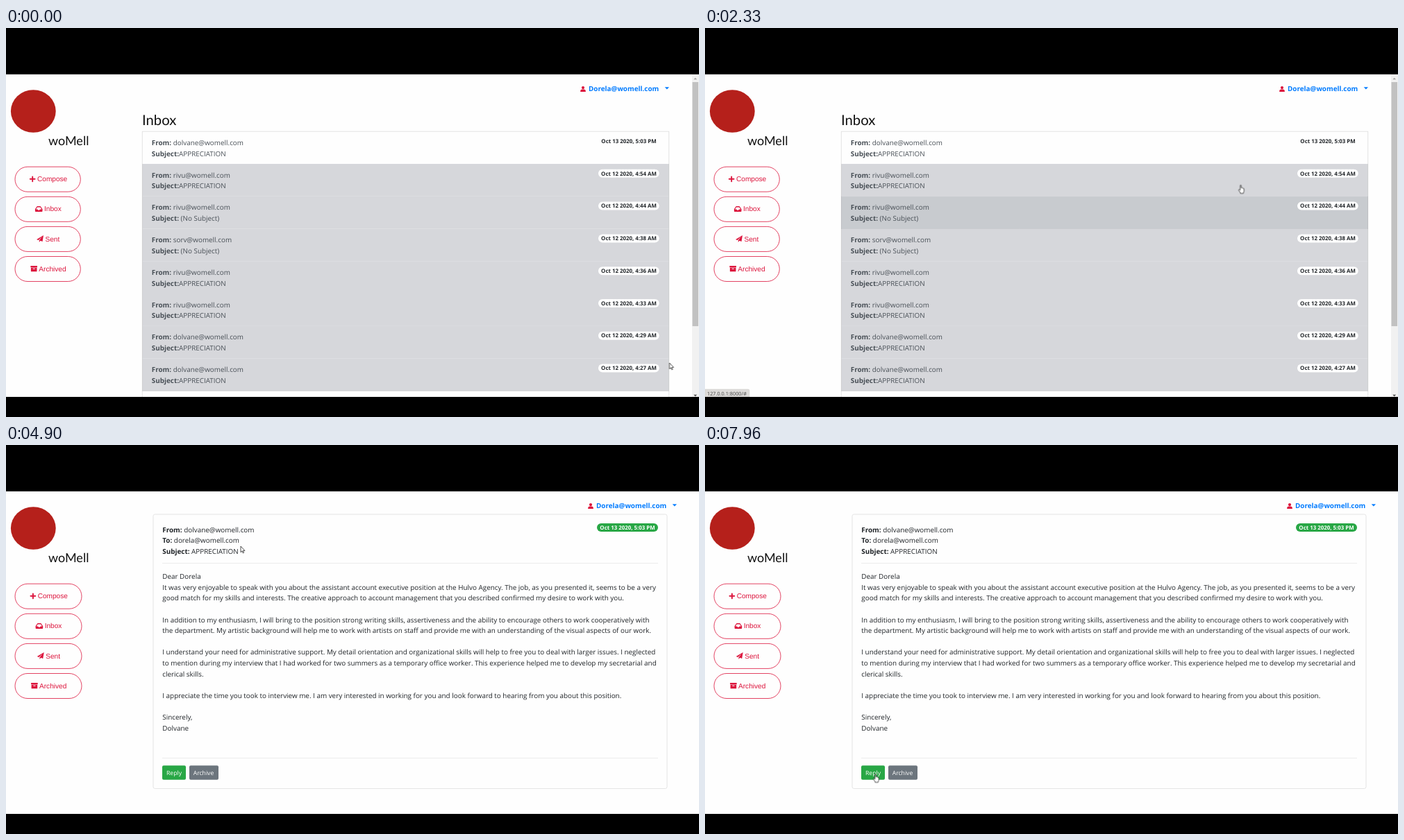
These frames come from a looping animation (998 px wide and 561 px high, 8 s). An HTML page:

```html
<!DOCTYPE html>
<html lang="en">
<head>
<meta charset="utf-8">
<title>Mail inbox</title>
<style>
html, body { margin: 0; width: 100%; height: 100%; overflow: hidden; background: #000; }
svg { display: block; width: 100vw; height: 100vh; }
text { font: 9.88px "Open Sans", sans-serif; fill: #212529; text-rendering: geometricPrecision; white-space: pre; }
.b { font-weight: 700; }
.list text { fill: #495057; }
.list .date, .date { font-size: 7.88px; font-weight: 700; text-anchor: middle; fill: #212529; }
.title { font: 20.3px Lato, sans-serif; fill: #111; }
.menu text { font: 10.1px "Liberation Sans", Arial, sans-serif; fill: #dc143c; }
.menu rect.pill { fill: none; stroke: #dc143c; stroke-width: .8; }
.user { font-weight: 700; fill: #007bff; }
.btn { font-size: 8.65px; fill: #fff; }
.light { fill: #fff; }
.status text { font-size: 7.3px; fill: #444; }
.rule { stroke: #e8e8e8; stroke-width: .8; }

.step { opacity: 0; animation: 8s step-end infinite; }
#inbox { animation-name: inbox; }
#letter { animation-name: letter; }
#hover7 { animation-name: hover7; }
#hover2 { animation-name: hover2; }
#hover1 { animation-name: hover1; }
#hover0 { animation-name: hover0; }
#short { animation-name: short; }
#wide { animation-name: wide; }
#arrow { animation-name: arrow; }
#hand { animation-name: hand; }
#beam { animation-name: beam; }
#cursor { animation: move 8s linear infinite; }

@keyframes inbox { 0% { opacity: 1 } 44.125%, 100% { opacity: 0 } }
@keyframes letter { 0% { opacity: 0 } 44.125%, 100% { opacity: 1 } }
@keyframes hover7 { 0% { opacity: 0 } 14.5% { opacity: 1 } 17.875%, 100% { opacity: 0 } }
@keyframes hover2 { 0% { opacity: 0 } 17.875% { opacity: 1 } 29.5%, 100% { opacity: 0 } }
@keyframes hover1 { 0% { opacity: 0 } 29.5% { opacity: 1 } 37%, 100% { opacity: 0 } }
@keyframes hover0 { 0% { opacity: 0 } 40.75%, 100% { opacity: 1 } }
@keyframes short { 0% { opacity: 0 } 20% { opacity: 1 } 43.25%, 100% { opacity: 0 } }
@keyframes wide { 0% { opacity: 0 } 43.25% { opacity: 1 } 49.4%, 100% { opacity: 0 } }
@keyframes arrow {
  0% { opacity: 1 } 14.5% { opacity: 0 } 47.875% { opacity: 1 } 48.4% { opacity: 0 }
  57.2% { opacity: 1 } 65.1% { opacity: 0 } 74.9% { opacity: 1 } 78.9% { opacity: 0 }
  86.6% { opacity: 1 } 90.2% { opacity: 0 } 94.7% { opacity: 1 } 99.1%, 100% { opacity: 0 }
}
@keyframes hand { 0% { opacity: 0 } 14.5% { opacity: 1 } 47.875% { opacity: 0 } 99.1%, 100% { opacity: 1 } }
@keyframes beam {
  0% { opacity: 0 } 48.4% { opacity: 1 } 57.2% { opacity: 0 } 65.1% { opacity: 1 }
  74.9% { opacity: 0 } 78.9% { opacity: 1 } 86.6% { opacity: 0 } 90.2% { opacity: 1 } 94.7%, 100% { opacity: 0 }
}
@keyframes move {
  0%, 14.11% { transform: translate(955.5px, 483px) }
  14.125% { transform: translate(953px, 480px) }
  17.875%, 19.99% { transform: translate(872px, 262px) }
  20% { transform: translate(868px, 266px) }
  21.25% { transform: translate(800px, 310px) }
  22.5%, 22.85% { transform: translate(742px, 338px) }
  24.4% { transform: translate(722px, 352px) }
  26.9% { transform: translate(738px, 300px) }
  29.125%, 29.48% { transform: translate(771.5px, 226.5px) }
  29.5%, 33.24% { transform: translate(771.5px, 224px) }
  33.25% { transform: translate(768px, 218px) }
  35.75% { transform: translate(722px, 180px) }
  37%, 47.86% { transform: translate(715px, 172.5px) }
  47.875% { transform: translate(712px, 174px) }
  51.25% { transform: translate(600px, 235px) }
  54.4% { transform: translate(440px, 225px) }
  57.5%, 61.24% { transform: translate(368px, 178px) }
  61.25%, 61.6% { transform: translate(338px, 146px) }
  63.125% { transform: translate(310px, 116px) }
  66.25% { transform: translate(330px, 220px) }
  71.25%, 74.49% { transform: translate(352px, 400px) }
  74.5% { transform: translate(348px, 402px) }
  76.25% { transform: translate(262px, 455px) }
  78.75% { transform: translate(420px, 420px) }
  82%, 85.74% { transform: translate(650px, 284px) }
  85.75%, 86.2% { transform: translate(706px, 234.3px) }
  87.5% { transform: translate(860px, 130px) }
  88.5% { transform: translate(885px, 102px) }
  91.25% { transform: translate(700px, 230px) }
  95%, 97.86% { transform: translate(362px, 432px) }
  97.875% { transform: translate(345px, 438px) }
  98.75% { transform: translate(268px, 462px) }
  99.1% { transform: translate(235px, 472px) }
  99.5%, 100% { transform: translate(245.5px, 474.5px) }
}
</style>
</head>
<body>
<svg viewBox="0 0 998 561" preserveAspectRatio="none">
  <defs>
    <path id="plus" d="M-3.4 0H3.4M0-3.4V3.4" stroke="#dc143c" stroke-width="1.9" stroke-linecap="round"/>
    <path id="tray" fill="#dc143c" fill-rule="evenodd" d="M-5.3.4-3-3.2Q-2.6-3.8-2-3.8H2Q2.6-3.8 3-3.2L5.3.4V3q0 1-1 1h-8.600q-1 0-1-1zM-2.200-2.400-4 .5h2.200l.8 1.300h2l.8-1.300H4L2.200-2.400z"/>
    <path id="plane" fill="#dc143c" d="M-5 .9 5-4.900 3.500 4 .5 2.700-1.200 4.900V2.200L3-3-2.300 1.900z"/>
    <path id="box" fill="#dc143c" fill-rule="evenodd" d="M-4.800-4.200h9.600v2.300h-9.600zM-4.300-1.300h8.600v5.500h-8.600zM-1.500-.3v.9h3v-.9z"/>
    <g id="account">
      <path fill="#dc143c" d="M831 84a2.100 2.100 0 0 1 0 4.200a2.100 2.100 0 0 1 0-4.200M827.200 92v-.9q0-2.500 2.500-2.500h2.600q2.500 0 2.500 2.500v.9z"/>
      <text class="user" x="839" y="90.700">Dorela@womell.com</text>
      <path fill="#007bff" d="M948.700 85.200h6.300l-3.150 3.200z"/>
    </g>
  </defs>

  <rect y="66.600" width="998" height="466" fill="#fefefe"/>
  <ellipse cx="39.300" cy="120" rx="32.400" ry="30.800" fill="#b5201b"/>
  <text class="title" x="61" y="169" style="font-size:18px">woMell</text>

  <g id="inbox" class="step">
    <use href="#account"/>
    <text class="title" x="196" y="140">Inbox</text>
    <g id="list" class="list"></g>
    <rect x="988" y="67" width="10" height="465" fill="#f1f1f1"/>
    <rect x="988.500" y="78" width="8.500" height="352" fill="#c1c1c1"/>
    <path d="M990.300 74.300h4.800l-2.400-2.600z" fill="#a3a3a3"/>
    <path d="M990.300 528.800h4.800l-2.400 2.600z" fill="#505050"/>
  </g>

  <g id="letter" class="step">
    <use href="#account" x="11"/>
    <rect x="212" y="100" width="740" height="395.500" rx="2.600" fill="none" stroke="#dfdfdf" stroke-width=".8"/>
    <text x="225.300" y="125.500"><tspan class="b">From:</tspan> dolvane@womell.com</text>
    <text x="225.300" y="141.100"><tspan class="b">To:</tspan> dorela@womell.com</text>
    <text x="225.300" y="156.700"><tspan class="b">Subject:</tspan> APPRECIATION</text>
    <rect x="851" y="113" width="88" height="12" rx="6" fill="#28a745"/>
    <text class="date" x="895" y="121.900" style="fill:#fff">Oct 13 2020, 5:03 PM</text>
    <path class="rule" d="M225 170.500H939M225 451.500H939"/>
    <g id="body"></g>
    <rect x="225" y="462.300" width="34" height="20.500" rx="2" fill="#28a745"/>
    <text class="btn" x="231" y="476.300">Reply</text>
    <rect x="264" y="462.300" width="42" height="20.500" rx="2" fill="#6c757d"/>
    <text class="btn" x="269.700" y="476.300">Archive</text>
  </g>

  <g id="short" class="step status">
    <path d="M0 521H62q2 0 2 2V532H0z" fill="#dcdad8" stroke="#cfcdcb" stroke-width=".5"/>
    <text x="3" y="530.400">127.0.0.1:8000/#</text>
  </g>
  <g id="wide" class="step status">
    <path d="M0 521H329.500q2 0 2 2V532H0z" fill="#e5dbd8" stroke="#d2cac8" stroke-width=".5"/>
    <text x="3" y="530.400">127.0.0.1:8000/#</text>
  </g>

  <rect width="998" height="66.600"/>
  <rect y="532" width="998" height="29"/>

  <g id="cursor" fill="#fff" stroke="#222" stroke-width=".8" stroke-linejoin="round">
    <path id="arrow" class="step" d="M0 0V8.700L2 6.900 3.300 9.900 4.600 9.300 3.300 6.400H6z"/>
    <path id="hand" class="step" d="M-.8 6.500V1Q-.8 0 0 0T.8 1V4.100Q1.500 3.500 2.100 4.300 2.800 3.800 3.400 4.700 4.800 4.400 4.800 6V8.300Q4.800 9.900 3.900 10.900V12H-.5V11L-2.900 7.700Q-3.300 6.600-2.300 6.400-1.500 6.300-.8 7.400z"/>
    <path id="beam" class="step" fill="none" d="M-2-4h1.300Q0-4 0-3.400 0-4 .7-4H2M0-3.400V3.400M-2 4h1.300Q0 4 0 3.400 0 4 .7 4H2"/>
  </g>
</svg>
<script>
const $ = id => document.getElementById(id);
const put = (id, html) => $(id).insertAdjacentHTML('beforeend', html);

function menu(width, shift) {
  const items = [['Compose', 'plus', 38.2, 45], ['Inbox', 'tray', 47.2, 55],
                 ['Sent', 'plane', 49, 56.5], ['Archived', 'box', 40.2, 47.3]];
  return '<g class="menu">' + items.map(([label, icon, ix, tx], i) => {
    const y = 200.2 + 43.1 * i;
    return `<rect class="pill" x="13" y="${y}" width="${width}" height="36" rx="18"/>
      <use href="#${icon}" x="${ix + shift}" y="${y + 17.6}"/>
      <text x="${tx + shift}" y="${y + 21.1}">${label}</text>`;
  }).join('') + '</g>';
}
put('inbox', menu(94.3, 0));
put('letter', menu(96, .7));

const topic = 'APPRECIATION', none = ' (No Subject)';
const mails = [
  ['dolvane', topic, '13 2020, 5:03 PM'], ['rivu', topic, '12 2020, 4:54 AM'],
  ['rivu', none, '12 2020, 4:44 AM'], ['sorv', none, '12 2020, 4:38 AM'],
  ['rivu', topic, '12 2020, 4:36 AM'], ['rivu', topic, '12 2020, 4:33 AM'],
  ['dolvane', topic, '12 2020, 4:29 AM'], ['dolvane', topic, '12 2020, 4:27 AM']
];
const pitch = 46.76, top0 = 149.2;
const band = (y, fill, extra = '') =>
  `<rect x="196.3" y="${y}" width="758.4" height="${pitch + .1}" fill="${fill}" ${extra}/>`;

put('list', mails.map(([who, subject, date], i) => {
  const y = top0 + pitch * i;
  const hover = [0, 1, 2, 7].includes(i)
    ? `<g id="hover${i}" class="step">${band(y, i ? '#c8cbcf' : '#f8f9fc')}
       <path d="M196.3 ${y + pitch}h758.4" stroke="#b3b6ba" stroke-width=".7"/></g>` : '';
  return (i ? band(y, '#d6d7db') : '') + hover +
    `<text x="209.8" y="${y + 19.7}"><tspan class="b">From:</tspan> ${who}@womell.com</text>
     <text x="209.8" y="${y + 35.3}"><tspan class="b">Subject:</tspan>${subject}</text>
     ${i ? `<rect class="light" x="853" y="${y + 7.9}" width="87.700" height="12" rx="6"/>` : ''}
     <text class="date" x="897" y="${y + 16.7}">Oct ${date}</text>`;
}).join('') + `<path d="M196.300 540V149.200H954.700V540M196.300 523.300H954.700" fill="none" stroke="#000" stroke-opacity=".14" stroke-width=".8"/>`);

const letter = `Dear Dorela
It was very enjoyable to speak with you about the assistant account executive position at the Hulvo Agency. The job, as you presented it, seems to be a very
good match for my skills and interests. The creative approach to account management that you described confirmed my desire to work with you.

In addition to my enthusiasm, I will bring to the position strong writing skills, assertiveness and the ability to encourage others to work cooperatively with
the department. My artistic background will help me to work with artists on staff and provide me with an understanding of the visual aspects of our work.

I understand your need for administrative support. My detail orientation and organizational skills will help to free you to deal with larger issues. I neglected
to mention during my interview that I had worked for two summers as a temporary office worker. This experience helped me to develop my secretarial and
clerical skills.

I appreciate the time you took to interview me. I am very interested in working for you and look forward to hearing from you about this position.

Sincerely,
Dolvane`;
put('body', letter.split('\n').map((line, i) =>
  line && `<text x="225.3" y="${193.2 + 15.6 * i}">${line}</text>`).join(''));
</script>
</body>
</html>
```
